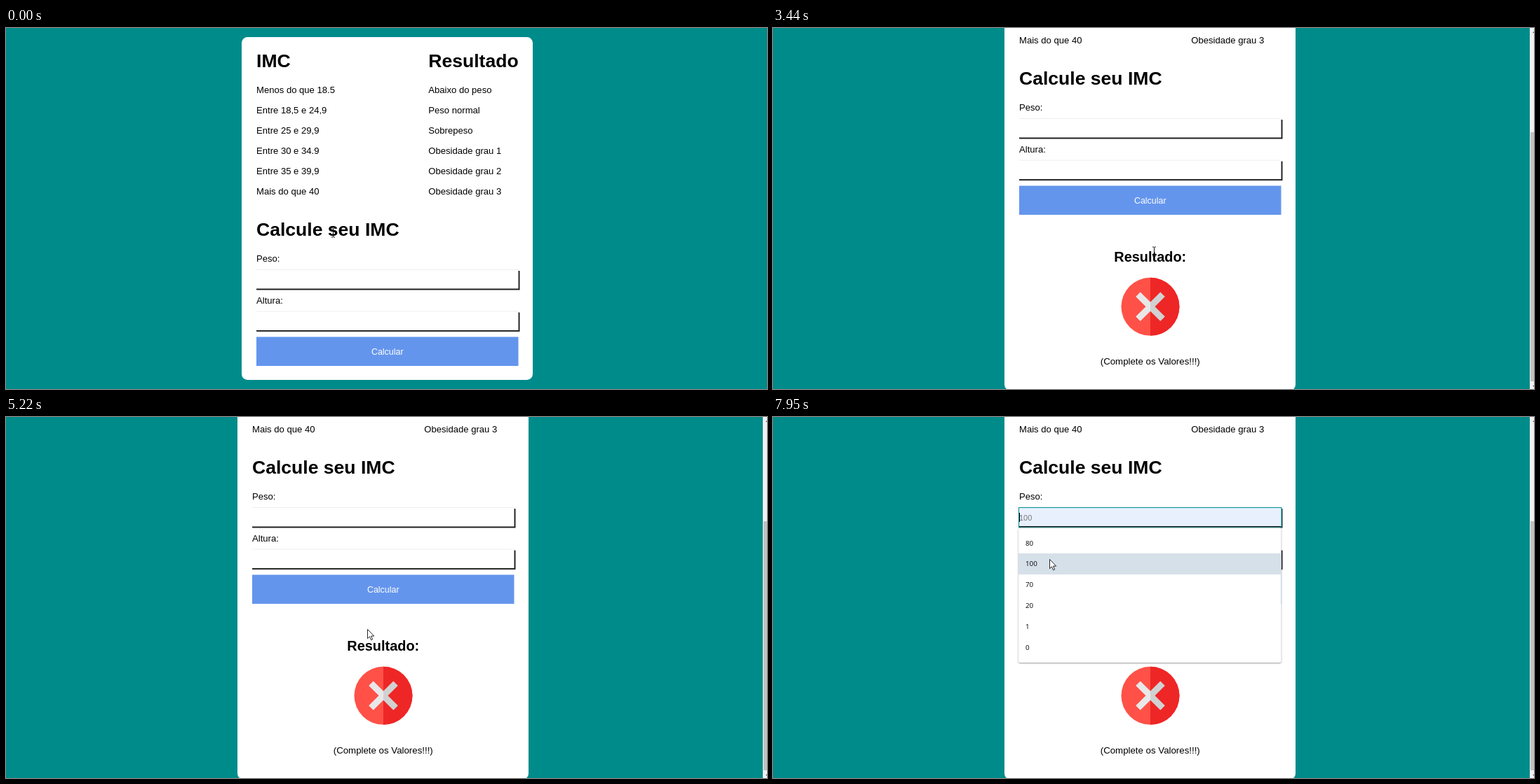
An HTML page for the animation above (8000 ms loop, 1085 by 516 pixels).

```html
<!DOCTYPE html>
<html lang="pt">
<head>
<meta charset="utf-8">
<title>IMC</title>
<style>
  html, body { margin: 0; width: 100%; height: 100%; overflow: hidden; background: #008b8b; }
  svg { display: block; width: 1085px; height: 516px; }
  text { font: 13.08px "Liberation Sans", Arial, sans-serif; white-space: pre; }
  .h1 { font-size: 26.56px; font-weight: bold; }
  .h2 { font-size: 19.92px; font-weight: bold; }
  .mid { text-anchor: middle; }
  #list { filter: drop-shadow(0 1px 1px rgba(0, 0, 0, .4)); }
  #list text { font: 9.8px "Open Sans", "Noto Sans", sans-serif; }
</style>
</head>
<body>
<svg viewBox="0 0 1085 516">
  <g id="page">
    <rect id="panel" x="336" y="13" width="415" rx="8.3" fill="#fff"/>
    <g id="static"></g>
    <g id="focus">
      <rect id="fill" x="356.5" y="345.5" width="374.5" height="28.3" stroke="#008b8b"/>
      <path d="M357 372.6H730.5" stroke="#111" stroke-width="1.4"/>
      <text id="preview" x="357" y="363.5" fill="#777" style="font-size:11px"></text>
      <path d="M357.5 353V366" stroke="#000"/>
    </g>
    <rect id="button" x="357" y="441.5" width="373.5" height="41.5"/>
    <text id="label" class="mid" x="543.75">Calcular</text>
    <rect id="ring" x="356.75" y="441.25" width="374" height="42" rx="1.5" fill="none" stroke-width="1.8"/>
    <g id="result">
      <text class="h2 mid" x="543.75" y="550">Resultado:</text>
      <g transform="translate(544 614.3)">
        <circle r="41.5" fill="#ff5147"/>
        <path d="M0-41.5A41.5 41.5 0 0 1 0 41.5Z" fill="#ee2626"/>
        <path id="cross" d="M0-6.5L-14.3-20.8L-20.8-14.3L-6.5 0L-20.8 14.3L-14.3 20.8L0 6.5Z" fill="#e8e8e8"/>
        <use href="#cross" transform="scale(-1 1)" style="filter:brightness(.9)"/>
      </g>
      <text class="mid" x="543.75" y="697" style="font-size:13.28px">(Complete os Valores!!!)</text>
    </g>
  </g>
  <g id="list">
    <rect x="350" y="158.5" width="374.5" height="192.5" rx="2.5" fill="#fff"/>
    <rect id="row" x="350" width="374.5" height="30" fill="#d6e0e9"/>
  </g>
  <g id="bar">
    <rect x="1079" width="6" height="516" fill="#f1f1f1"/>
    <rect id="thumb" x="1080" width="5" height="356" fill="#c1c1c1"/>
    <path d="M1083 7L1086 4V7ZM1083 511H1086V514Z" fill="#505050"/>
  </g>
  <g id="cursor">
    <path id="arrow" d="M.5.5V13.7L3.5 10.9L5.6 15.8L7.7 14.9L5.6 10.1H9.7Z" fill="#fff" stroke="#111" stroke-width=".9"/>
    <path id="beam" d="M-2.5-6.5H-1L0-5.8L1-6.5H2.5M0-6V6M-2.5 6.5H-1L0 5.8L1 6.5H2.5" fill="none" stroke="#111"/>
  </g>
</svg>
<script>
const $ = id => document.getElementById(id);
const set = (id, attrs) => { for (const k in attrs) $(id).setAttribute(k, attrs[k]); };
const show = (id, on) => { $(id).style.display = on ? '' : 'none'; };
const label = (x, y, s, cls = '') => `<text class="${cls}" x="${x}" y="${y}">${s}</text>`;
const field = y => `<path d="M357 ${y - .5}H730" stroke="#eee"/>
  <path d="M357.5 ${y + 28}H732V${y + 1.5}" fill="none" stroke="#bbb" stroke-width="2"/>
  <path d="M357 ${y + 27.4}H731.4V${y + 1}" fill="none" stroke="#1c1c1c" stroke-width="1.7"/>`;

const ranges = ['Menos do que 18.5', 'Entre 18,5 e 24,9', 'Entre 25 e 29,9',
  'Entre 30 e 34.9', 'Entre 35 e 39,9', 'Mais do que 40'];
const verdicts = ['Abaixo do peso', 'Peso normal', 'Sobrepeso',
  'Obesidade grau 1', 'Obesidade grau 2', 'Obesidade grau 3'];
const column = (x, title, lines) => label(x, 56, title, 'h1') +
  lines.map((s, i) => label(x, 93 + 29 * i, s)).join('');
$('static').innerHTML = column(357, 'IMC', ranges) + column(602.3, 'Resultado', verdicts) +
  label(357, 297, 'Calcule seu IMC', 'h1') +
  label(357, 334, 'Peso:') + field(346) + label(357, 394, 'Altura:') + field(405.5);

const options = ['80', '100', '70', '20', '1', '0'];
$('list').insertAdjacentHTML('beforeend', options.map((s, i) => label(360, 183.5 + 29.9 * i, s)).join(''));

const clamp = u => Math.max(0, Math.min(1, u));
const ease = (t, from, to) => { const u = clamp((t - from) / (to - from)); return u * u * (3 - 2 * u); };
const mix = (a, b, u) => `rgb(${a.map((v, i) => Math.round(v + (b[i] - v) * u))})`;
const blue = [100, 149, 237], white = [255, 255, 255], dark = [16, 16, 16];

// pointer glides: start, end, x, y
const glides = [
  [1800, 2000, 532, 446], [2540, 2830, 543, 319], [3440, 3680, 533, 240], [3800, 4130, 516, 327],
  [4250, 4400, 560, 272], [4450, 4690, 539, 303], [5150, 5220, 515, 303], [5420, 5700, 478, 318],
  [5750, 6050, 535, 294], [6660, 7340, 465, 121], [7340, 7480, 475, 150], [7600, 7900, 394, 203]
];
function pointer(t) {
  // circles over the form first, then glides from stop to stop
  const a = Math.max(0, Math.min(t, 1800) - 300) / 197;
  let x = 443.8 + 29.8 * Math.cos(a + .75), y = 345 - 53 * Math.cos(a);
  for (const [from, to, gx, gy] of glides) {
    const u = ease(t, from, to);
    x += (gx - x) * u;
    y += (gy - y) * u;
  }
  return [x, y];
}

// the button's hover look fades in and out around each visit
const visits = [[1960, 2570], [3586, 3898], [6827, 6959]];
const fade = (t, from) => clamp((t - from) / 250);
const hover = t => visits.reduce((sum, [enter, leave]) => sum + fade(t, enter) - fade(t, leave), 0);

// left, top, right, bottom of areas with a text pointer
const textZones = [
  [357, 274, 561, 303], [493, 533, 595, 557], [357, 346, 731, 373], [357, 406, 731, 433]
];

function draw(t) {
  const open = t >= 2205, listed = t >= 7615;
  const scroll = ease(t, 2500, 2830);
  const dx = open ? -6 : 0, dy = open ? -15 - 201 * scroll : 0;
  set('page', { transform: `translate(${dx} ${dy})` });
  set('panel', { height: open ? 721 : 490 });
  set('thumb', { y: 11 + 138 * scroll });
  show('result', open);
  show('bar', open);

  const h = hover(t), size = 12.45 + 8.75 * h, glow = `rgba(${blue},${h})`;
  set('button', { fill: mix(blue, white, h) });
  $('button').style.filter = h ? `drop-shadow(0 0 .8px ${glow}) drop-shadow(1px 1px 1.2px ${glow})` : '';
  set('label', { fill: mix(white, blue, h), y: 462.2 + .35 * size });
  $('label').style.fontSize = size + 'px';
  show('ring', t >= 6315 && !listed);
  set('ring', { stroke: mix(white, dark, clamp((t - 6250) / 200)) });

  const [x, y] = pointer(t);
  const row = listed ? Math.floor((y - 165) / 29.9) : -1;
  show('focus', listed);
  show('list', listed);
  show('row', row >= 0);
  set('row', { y: 165 + 30 * Math.max(row, 0) });
  set('fill', { fill: row >= 0 ? '#e8f0fe' : '#fff' });
  $('preview').textContent = row >= 0 ? options[row] : '';

  const px = x - dx, py = y - dy;
  const beam = !(listed && y > 158) &&
    textZones.some(([l, top, r, b], i) => (i !== 1 || open) && px > l && px < r && py > top && py < b);
  const snap = v => Math.round(v) + (beam ? .5 : 0);
  set('cursor', { transform: `translate(${snap(x)} ${snap(y)})` });
  show('beam', beam);
  show('arrow', !beam);
}

function loop() {
  draw(performance.now() % 8000);
  requestAnimationFrame(loop);
}
loop();
</script>
</body>
</html>
```
